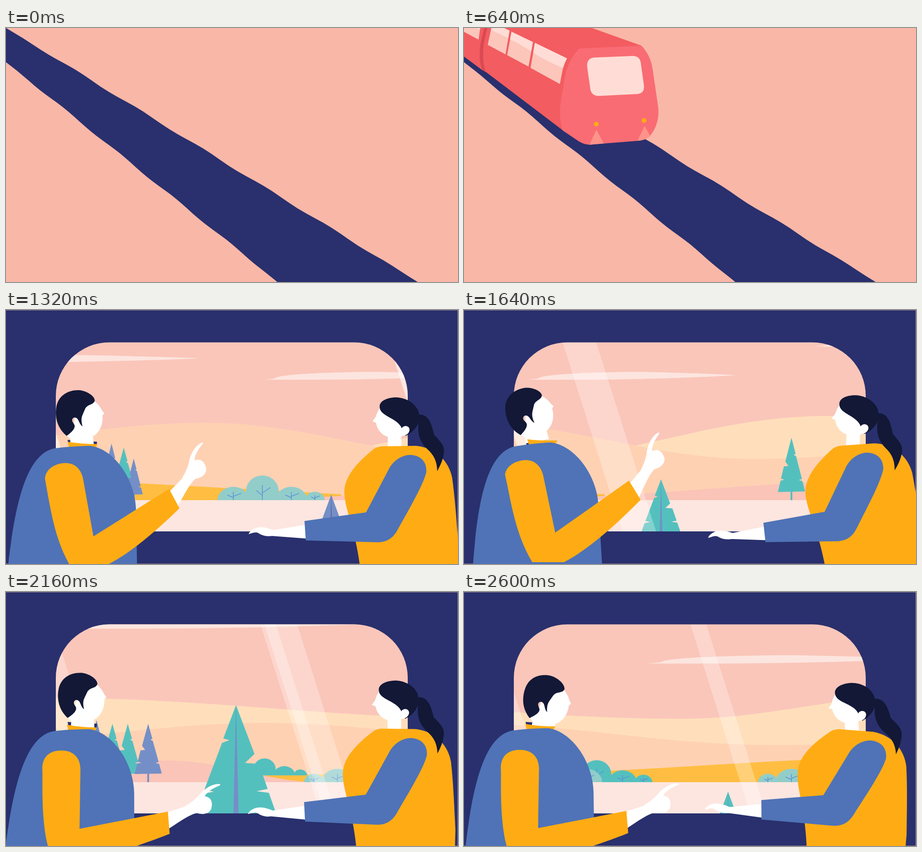
Recreate the animation shown at these times as an HTML page. Size 998 by 561 pixels, loop 2.64 s.

```html
<!DOCTYPE html>
<html lang="en">
<head>
<meta charset="utf-8">
<title>Train ride</title>
<style>
  html, body { margin: 0; width: 100%; height: 100%; overflow: hidden; background: #f9b7a7; }
  svg { display: block; width: 998px; height: 561px; }
</style>
</head>
<body>
<svg viewBox="0 0 998 561">
  <defs>
    <clipPath id="pane"><rect x="110" y="71.500" width="777" height="417.500" rx="118"/></clipPath>
    <clipPath id="glass">
      <path d="M211,78 254,98 244,158 199,134Z M259,101 313,127 302,189 248,160Z M318,129 399,168Q390,185 387,202L381,233 307,192Z
        M58,3 89,17 80,69 48,52Z M94,21 135,41 126,94 84,71Z M139,43 188,66Q181,80 179,98L176,121 129,96Z M-60,-45 33,-2 25,40 -60,-6Z"/>
    </clipPath>
  </defs>

  <g id="outside">
    <path id="track" fill="#29306d"/>
    <g id="train">
      <path fill="#f35c60" d="M-100,-14L38,91 45,93 184,197 195,203 390,351 450,300 587,136 345,50 330,51 325,43 145,-20 -100,-70Z"/>
      <g fill="#d94a52">
        <path d="M185,197C178,180 177,155 181,130C187,100 195,72 205,53Q208,47 214,47L326,44 330,50 217,54Q212,54 209,62C200,82 192,110 188,140C186,165 188,185 194,203Z"/>
        <path d="M37,90C31,75 30,55 33,35C35,20 38,5 42,-8L52,-8C46,10 42,25 40,45C38,65 41,80 45,93Z"/>
      </g>
      <g clip-path="url(#glass)">
        <path fill="#fcc6bb" d="M-70,-60H410V240H-70Z"/>
        <path fill="#ffddd6" d="M-70,-60H410V202L388,192Q340,172 308,150T207,96L182,97Q150,82 130,67T50,20L29,25 -70,-20Z"/>
      </g>
      <path fill="#f96c73" d="M435,143L587,136C600,150 612,170 615,195L629,290C632,310 628,340 610,362Q600,374 580,376L457,386Q440,386 425,375L388,350C378,320 380,285 390,240C394,205 402,175 424,150Q428,143 435,143Z"/>
      <path fill="#ffddd6" d="M467,166L565,162Q582,162 585,178L593,235Q596,256 577,258L480,263Q461,263 458,246L450,190Q448,168 467,166Z"/>
      <path fill="#ff938a" d="M473,348L492,383 456,386Z M595,339L609,364Q601,374 577,376Z"/>
      <g fill="#ffac14"><circle cx="473" cy="334" r="6"/><circle cx="593.500" cy="325" r="6"/></g>
    </g>
  </g>

  <g id="inside">
    <path fill="#29306d" d="M0,.6H997.400V560.500H0Z"/>
    <g clip-path="url(#pane)">
      <path fill="#fac6ba" d="M100,60H900V500H100Z"/>
      <g id="world"></g>
      <g id="beams" fill="#fff"></g>
    </g>

    <path fill="#29306d" d="M136,287L201,291 200,300 138,298Z"/>
    <g id="manHead">
      <path fill="#fff" d="M160,190L196,202C206,210 210,218 212,222L217,228 213,233C215,255 205,272 192,279L194,298 142,298 142,284 134,278 150,250Z"/>
      <path fill="#121836" d="M134,278C112,260 108,235 111,215C115,190 135,177 160,177C178,178 196,190 196,200C193,211 179,207 174,220C168,235 164,238 169,257C164,254 162,248 160,244C156,235 147,236 146,243C146,250 154,252 151,260C149,266 142,272 134,278Z"/>
    </g>
    <g id="manBody">
      <path fill="#ffac14" d="M136,291Q165,296 202,296L196,310 141,310Z"/>
      <path fill="#4f73b6" d="M0,600L5,561C20,430 45,312 112,305Q140,301 187,300C240,308 285,375 287,440L290,600Z"/>
    </g>
    <g id="manLimb">
      <path id="manHand" fill="#fff" d="M360,402L388,373C398,355 402,345 404,335C408,315 420,298 432,293Q436,292 434,296C424,308 417,320 416,332C428,328 438,332 442,350C443,362 432,371 418,373C405,385 395,405 378,436Z"/>
      <path id="manArm" fill="#ffac14"/>
    </g>

    <g id="womanNeck"><path fill="#fff" d="M843,270H873V306H843Z"/></g>
    <g id="womanBody">
      <path fill="#ffac14" d="M786,600L781,562C768,470 747,440 747,400C748,360 790,325 812,307Q820,302 830,301L905,300C950,304 978,335 985,370C992,420 995,470 999,520V600Z"/>
    </g>
    <g id="womanHead">
      <path fill="#fff" d="M828,213C818,225 818,235 815,238L809,246 817,249C820,268 835,282 855,282L873,280 890,262 880,230Z"/>
      <path fill="#121836" d="M825,213C825,200 843,193 862,193C885,194 905,207 911,225L912,231C935,230 940,255 945,275C955,287 968,297 967,312C966,330 958,345 952,356C952,335 945,320 930,307C912,290 908,270 911,248C906,262 895,272 882,278L874,262C868,245 845,238 835,230C828,225 825,220 825,213Z"/>
      <path fill="#fff" d="M873,263C876,254 890,254 891,264C891,273 881,280 872,277Z"/>
    </g>
    <g id="womanLimb">
      <path fill="#fff" d="M664,474L590,486C575,480 560,477 548,483C540,487 536,492 536,495C545,492 552,490 556,492C565,498 575,501 587,499L666,505Z"/>
      <path fill="#4f73b6" d="M659,466L795,447L845,352C855,332 875,320 893,320C915,321 930,335 928,358C922,385 890,440 866,483C855,505 840,513 820,513L662,509Z"/>
    </g>
  </g>
</svg>

<script>
const LOOP = 2640, STEP = 40, CUT = 1200, ORIGIN = 1320;
const WORLD_SPEED = 1.3406, BEAM_SPEED = 2.5; // px per ms
const TEAL = '#54c0be', BLUE = '#748fc7', PALE = '#92cdca';
const $ = id => document.getElementById(id);
const ease = (u, k = Math.min(1, Math.max(0, u))) => k * k * (3 - 2 * k);
const path = (d, fill, extra = '') => `<path d="${d}" fill="${fill}" ${extra}/>`;
const place = (id, x, y, r = 0, px = 0, py = 0) =>
  $(id).setAttribute('transform', `translate(${x} ${y}) rotate(${r} ${px} ${py})`);

// Rolling ridge that levels out at each crest and valley.
function hill(fill, ...pts) {
  let d = `M${pts[0]}`;
  pts.slice(1).forEach(([x, y], i) => {
    const [x0, y0] = pts[i], s = (x - x0) * 0.364;
    d += `C${x0 + s},${y0} ${x - s},${y} ${x},${y}`;
  });
  return path(`${d}V421H${pts[0][0]}Z`, fill);
}

const cloud = (x, y, w, h) =>
  path('M0,.8C.03,.2 .4,0 .55,.05S1,.4 1,.45 .6,1 .2,1 -.01,1 0,.8Z', '#fde5df',
    `transform="translate(${x} ${y}) scale(${w} ${h})"`);

const NOTCHED = 'M0,0L.31,.3 .16,.315 .34,.34 .77,.76 .54,.78 .81,.8 1,.99 -1,1 -.8,.79 -.5,.775 -.77,.755 -.56,.53 -.22,.52 -.45,.44Z';

const pine = (x, top, fill, base = 402, w = 30) =>
  path(`M${x - 2},${base - 4}H${x + 2}V420H${x - 2}Z`, fill) +
  path(NOTCHED, fill, `transform="translate(${x} ${top}) scale(${w} ${base - top})"`);

function nearPine(x, top, fill, stripe) {
  const h = 495 - top;
  return path(h > 100 ? NOTCHED : 'M0,0L1,1H-1Z', fill, `transform="translate(${x} ${top}) scale(${-h * 0.37} ${h})"`) +
    path(`M${x},${top}l${h * 0.024},${h}h${-h * 0.048}Z`, stripe);
}

function dome(x, r, h, base, fill, twigs) {
  const ry = Math.min(h, r * 0.95), y = base - h + ry;
  const lines = `M${x},${base}v${-h * 0.62}M${x},${base - h * 0.3}l${r * 0.5},${-h * 0.22}M${x},${base - h * 0.2}l${-r * 0.38},${-h * 0.2}`;
  return path(`M${x - r},${base}V${y}A${r},${ry} 0 0 1 ${x + r},${y}V${base}Z`, fill) +
    (twigs ? path(lines, 'none', 'stroke="#5b8fd6" stroke-width="1.5"') : '');
}

// Row of four domes; dir -1 mirrors it.
const bushes = (x, dir, fill = PALE, k = 1, base = 420.5, twigs = true) =>
  [[-64, 35, 30], [64, 35, 30], [116, 22, 19], [0, 36, 55]]
    .map(([dx, r, h]) => dome(x + dx * dir * k, r * k, h * k, base, fill, twigs)).join('');

$('world').innerHTML =
  cloud(-150, 99, 575, 17) + cloud(594, 136, 433, 18) + cloud(1250, 48, 830, 33) + cloud(2152, 139, 560, 19) +
  hill('#ffdfbb', [520, 335], [1230, 234], [2196, 280], [2750, 225]) +
  hill('#ffd1b3', [-250, 310], [440, 249], [1069, 329], [1696, 289], [2400, 338], [2750, 330]) +
  path('M-250,353L740,407V421H-250Z', '#ffbe42') +
  hill('#ffbe42', [1690, 404], [2800, 362]) +
  hill('#fac4b8', [420, 421], [1480, 372], [1830, 421]) +
  pine(233, 295, BLUE, 402, 26) + pine(260, 304, TEAL, 404, 27) + pine(282, 328, BLUE, 408, 20) +
  pine(1152, 282, TEAL) + pine(1326, 283, BLUE) + pine(1361, 291, TEAL) + pine(1395, 291, TEAL) + pine(1440, 291, BLUE) +
  bushes(566, 1) + bushes(1697, 1, TEAL, 0.68, 405, false) + bushes(2009, 1, TEAL, 0.89) +
  bushes(1922, -1) + bushes(2503, -1) +
  path('M-300,420H2800V500H-300Z', '#fde6e0') +
  nearPine(718, 408, BLUE, '#5b6799') + nearPine(864, 374, TEAL, BLUE) +
  nearPine(1634, 250, TEAL, BLUE) + nearPine(2299, 441, TEAL, BLUE);

// Glints on the glass: left end, width, opacity.
$('beams').innerHTML = [[-20, 67, 0.6], [845, 25, 0.6], [1018, 74], [2140, 64], [2662, 34], [2671, 72], [3200, 63], [3700, 35]]
  .map(([x, w, o = 0.28]) => path(`M${x},72h${w}l132,417h${-w}Z`, '#fff', `opacity="${o}"`)).join('');

const ARM_UP = 'M86,372C88,350 110,338 132,338C152,338 166,352 170,372L193,500L360,395L383,438C330,490 270,540 225,562L140,562C110,510 100,450 90,395Z';
const ARM_DOWN = 'M82,395C79,360 100,348 124,348C148,348 166,362 166,390L164,521L359,483L363,532C330,545 310,552 280,562L95,562C84,525 82,470 82,430Z';

function mix(a, b, k) {
  const num = /-?\d+/g, n = b.match(num);
  let i = 0;
  return a.replace(num, v => (+v + (n[i++] - v) * k).toFixed(2));
}

// Time, then: arm lowered, man's sway, man's nod, woman's lean.
const MOODS = [
  [1320, 0, 0, 0, 0],
  [1640, -0.15, 1, 1, 1],
  [2160, 1, -0.4, -0.25, -0.5],
  [2600, 1, -0.1, -1.15, -1.6]
];

function drawInside(t) {
  place('world', (ORIGIN - t) * WORLD_SPEED, 0);
  place('beams', (ORIGIN - t) * BEAM_SPEED, 0);

  const i = Math.max(0, MOODS.findLastIndex((m, n) => n < MOODS.length - 1 && m[0] <= t));
  const a = MOODS[i], b = MOODS[i + 1], k = ease((t - a[0]) / (b[0] - a[0]));
  const [, down, sway, nod, lean] = a.map((v, n) => v + (b[n] - v) * k);

  place('manHead', -16 * nod, -4 * nod, -10.5 * nod, 150, 240);
  place('manBody', 4 * sway, -6 * sway, -2.4 * sway, 150, 300);
  place('manLimb', 4 * sway, -5 * sway);
  place('manHand', -10 * down, 86 * down, 28 * down, 371, 416);
  $('manArm').setAttribute('d', mix(ARM_UP, ARM_DOWN, down));

  for (const id of ['womanNeck', 'womanHead']) place(id, 2 * lean, -4 * lean, 2 * lean, 883, 264);
  place('womanBody', lean, -3 * lean, -3.2 * lean, 860, 300);
  place('womanLimb', -3 * lean, -5 * lean, -2.2 * lean, 893, 340);
}

// Wavering line that stays pinned at both ends.
function edge(x0, y0, x1, y1, wave, phase) {
  return Array.from({ length: 49 }, (_, i) => {
    const k = i / 48, x = x0 + (x1 - x0) * k, fade = Math.min(1, 8 * k, 8 * (1 - k));
    const wob = 1.8 * Math.sin((x - phase) / wave * 2 * Math.PI) - 0.7;
    return `${x.toFixed(1)},${(y0 + (y1 - y0) * k + wob * fade).toFixed(1)}`;
  });
}

function drawOutside(t) {
  const top = edge(0, 0, 909, 561, 140, 50 + t * 0.2);
  const low = edge(0, 75.5, 599, 561, 121, 40 + t * 0.2).reverse();
  $('track').setAttribute('d', `M${top.concat(low).join('L')}Z`);
  const s = 0.625 + t / 2560;
  $('train').setAttribute('transform', `translate(-974 -641) scale(${s}) translate(974 641)`);
}

const start = performance.now();
function tick() {
  const t = Math.floor((performance.now() - start) % LOOP / STEP) * STEP;
  const out = t < CUT;
  $('outside').style.display = out ? '' : 'none';
  $('inside').style.display = out ? 'none' : '';
  (out ? drawOutside : drawInside)(t);
  requestAnimationFrame(tick);
}
tick();
</script>
</body>
</html>
```
